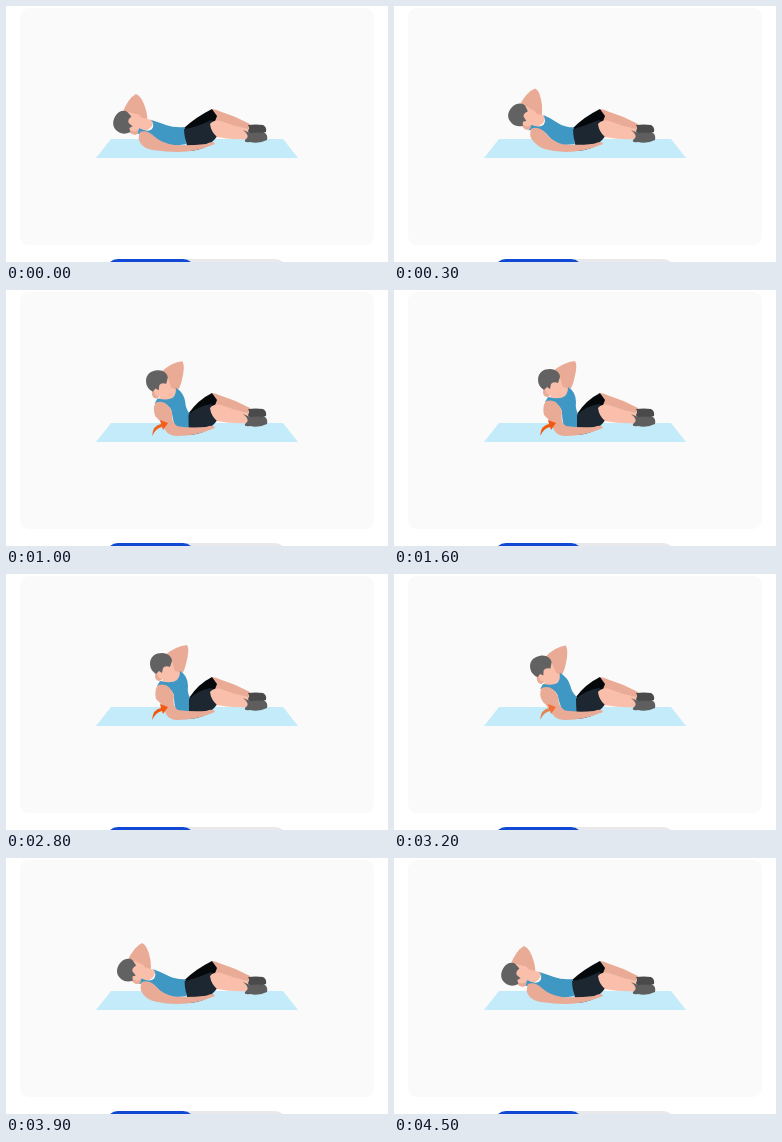
These frames come from a looping animation (382 px wide and 256 px high, 5.1 s). An HTML page:

```html
<!DOCTYPE html>
<html lang="en">
<head>
<meta charset="utf-8">
<title>Oblique crunch</title>
<style>
  html, body { margin: 0; width: 100%; height: 100%; overflow: hidden; background: #fff; }
  svg { display: block; width: 100%; height: 100%; }
  .skin { fill: #f9bfab; }
  .shade { fill: #eaab96; }
</style>
</head>
<body>
<svg viewBox="0 0 382 256">
  <rect x="14" y="2" width="354" height="237" rx="9" fill="#fafafa"/>
  <rect x="100" y="253" width="181" height="30" rx="12" fill="#e9e9ec"/>
  <rect x="100" y="253" width="89" height="30" rx="12" fill="#1249d4"/>
  <path d="M105 133H277L292 152H90Z" fill="#c3ebfa"/>

  <path class="shade" d="M204 104Q208 102 213 105Q229 110 244 118L242 125Q224 124 208 116Z"/>
  <path d="M242 119Q250 118 257 119Q261 121 260 126Q252 130 240 126Q245 123 242 119Z" fill="#4a4a4a"/>
  <path id="backShorts" fill="#06090c"/>
  <path id="raisedArm" class="shade"/>
  <path id="neck" class="skin"/>
  <path id="torso" fill="#3f97c4"/>
  <g id="head">
    <ellipse class="shade" cx="-4" cy="10" rx="4" ry="5"/>
    <path class="skin" d="M-7 5L0 0L9 -5L12 6Q11 14 4 15L-4 12Z"/>
    <path d="M-13 -2C-13 -10 -7 -13 -1 -13C5 -13 9 -9 9 -5L7 1Q2 -1 0 2L-1 7L-4 5L-7 8Q-13 4 -13 -2Z" fill="#626262"/>
  </g>
  <path id="frontShorts" fill="#1d2731"/>
  <path class="skin" d="M204 118Q208 113 215 115Q228 120 242 123L243 133Q227 134 211 131Q205 126 204 118Z"/>
  <path d="M237 124L244 127Q252 126 259 127Q262 129 261 134Q253 138 244 136Q238 137 239 134Q245 130 237 124Z" fill="#5e5e5e"/>
  <path id="frontArm" class="shade"/>
  <path id="arrow" d="M146 146Q147 135 155 134L154 130L162 133L157 140L156 137Q150 138 146 146Z" fill="#f2590f"/>
</svg>
<script>
const LOOP = 5100, STEP = 100, MIDDLE = 0.57;

// Each part in three poses: lying, halfway up, fully raised.
const poses = {
  backShorts: [
    "M178 122Q190 111 206 103L211 110L208 118L182 138Z",
    "M181 122Q191 110 206 103L211 110L208 118L183 138Z",
    "M183 124Q192 110 206 103L211 110L208 118L184 138Z"],
  frontShorts: [
    "M178 123Q192 121 205 114L213 119Q214 128 209 133Q200 144 183 145Q178 132 178 123Z",
    "M181 124Q191 117 205 114L213 119Q214 128 209 133Q200 144 183 145Q181 132 181 124Z",
    "M183 125Q192 116 205 114L213 119Q214 128 209 133Q200 144 183 145Q183 132 183 125Z"],
  raisedArm: [
    "M116 108Q122 92 130 88Q136 90 140 104Q142 112 141 118L130 116Z",
    "M141 87Q152 73 162 72Q166 76 163 92Q161 100 158 105L147 100Z",
    "M159 81Q170 72 181 71Q184 75 180 90Q178 98 174 103L164 98Z"],
  neck: [
    "M128 110L146 114Q150 122 134 127Z",
    "M147 98L159 102Q158 114 143 116Z",
    "M164 95L175 99Q173 111 154 110Z"],
  torso: [
    "M145 114Q152 116 160 119Q168 122 179 121L180 138L168 140Q155 138 149 132Q142 126 131 128L133 122Q142 127 146 123Q149 118 145 114Z",
    "M157 100Q166 105 171 113Q175 120 182 122L182 138L168 138Q163 130 159 120Q153 112 141 118L144 113Q154 114 157 110Q159 106 157 100Z",
    "M174 97Q182 102 182 112Q181 118 184 124L184 138L171 138Q168 132 168 122Q166 112 151 112L154 107Q166 110 171 106Q174 103 174 97Z"],
  frontArm: [
    "M134 126Q131 133 135 138Q139 143 147 144Q160 146 172 146Q190 146 209 138Q208 134 200 138Q183 140 168 139Q156 137 149 131Q141 123 134 126Z",
    "M143 117Q140 126 148 131Q154 137 157 141Q162 146 172 146Q190 146 209 138Q208 134 200 137Q183 139 170 137Q163 133 160 124Q153 112 143 117Z",
    "M152 111Q148 116 150 125Q158 132 160 140Q163 146 172 146Q190 146 209 138Q208 134 200 137Q185 138 172 136Q166 133 168 122Q164 108 152 111Z"],
  head: [
    "translate(121 116) rotate(-60)",
    "translate(141.5 97) rotate(-16)",
    "translate(157 92) rotate(0)"]
};

// Time in ms and how far the body is raised.
const lift = [[0, 0], [200, .11], [600, .47], [1100, 1], [3000, 1], [3500, .47], [3900, .11], [4100, 0], [LOOP, 0]];

const mix = (a, b, k) => a + (b - a) * k;
const byId = id => document.getElementById(id);

function liftAt(time) {
  const i = lift.findIndex(([end]) => time < end);
  const [t0, p0] = lift[i - 1], [t1, p1] = lift[i];
  return mix(p0, p1, (time - t0) / (t1 - t0));
}

function blend(from, to, k) {
  const number = /-?\d+(\.\d+)?/g;
  const ends = to.match(number);
  let i = 0;
  return from.replace(number, n => mix(+n, +ends[i++], k).toFixed(2));
}

function draw(time) {
  const p = liftAt(time);
  const [a, b, k] = p < MIDDLE ? [0, 1, p / MIDDLE] : [1, 2, (p - MIDDLE) / (1 - MIDDLE)];
  for (const [id, shapes] of Object.entries(poses)) {
    byId(id).setAttribute(id === "head" ? "transform" : "d", blend(shapes[a], shapes[b], k));
  }
  byId("arrow").setAttribute("opacity", Math.min(1, Math.max(0, (p - .43) / .5)));
}

const start = performance.now();
function tick() {
  const time = (performance.now() - start) % LOOP;
  draw(Math.floor(time / STEP) * STEP);
  requestAnimationFrame(tick);
}
tick();
</script>
</body>
</html>
```
